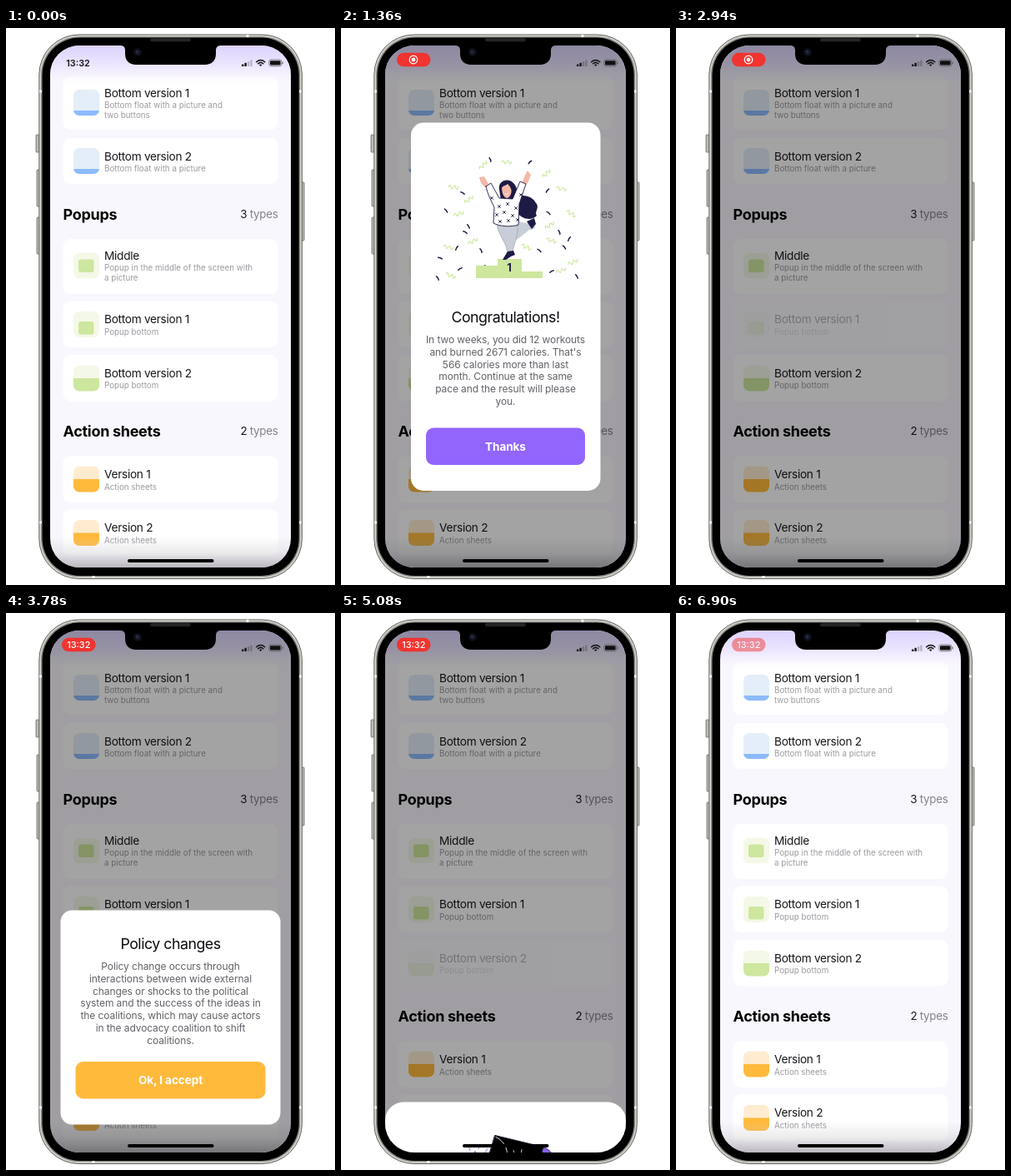
These frames come from a looping animation (395x668 px, 6960 ms). An HTML page:

```html
<!DOCTYPE html>
<html lang="en">
<head>
<meta charset="utf-8">
<title>Popups demo</title>
<style>
  html, body { margin: 0; width: 100%; height: 100%; overflow: hidden; background: #fff; }
  svg { display: block; width: 395px; height: 668px; font-family: Inter, "Open Sans", sans-serif; }
</style>
</head>
<body>
<svg id="stage" viewBox="0 0 395 668"></svg>
<script>
const NAVY = '#1d1b45', GREEN = '#cde79e', DARK = '#17161b', GREY = '#9b9aa0';

const rect = (x, y, w, h, r, fill, extra = '') =>
  `<rect x="${x}" y="${y}" width="${w}" height="${h}" rx="${r}" fill="${fill}" ${extra}/>`;
const path = (d, fill = 'none', stroke = 'none', width = 1, extra = '') =>
  `<path d="${d}" fill="${fill}" stroke="${stroke}" stroke-width="${width}" stroke-linecap="round" stroke-linejoin="round" ${extra}/>`;
const circle = (x, y, r, fill, extra = '') => `<circle cx="${x}" cy="${y}" r="${r}" fill="${fill}" ${extra}/>`;
const text = (x, y, str, size, { fill = DARK, weight = 400, gap = 0, anchor = 'start' } = {}) =>
  `<text x="${x}" y="${y}" font-size="${size}" fill="${fill}" font-weight="${weight}" letter-spacing="${gap}" text-anchor="${anchor}">${str}</text>`;
const centred = (y, str, size, opts) => text(197.5, y, str, size, { anchor: 'middle', ...opts });

// ---- list ----
const PALETTE = {
  blue: ['#e4eef8', '#8cbbfd'],
  green: ['#f4f8e7', GREEN],
  orange: ['#ffecd0', '#ffba3c'],
};

// top, height, icon top, colour, shape [x, y, w, h, r] inside the icon, title, subtitle lines
const BAR = [0, 15.5, 31, 16, 0];
const CARDS = [
  [58, 64, 74, 'blue', [0, 25, 31, 6, 0], 'Bottom version 1', ['Bottom float with a picture and', 'two buttons']],
  [132, 55, 144, 'blue', [0, 25, 31, 6, 0], 'Bottom version 2', ['Bottom float with a picture']],
  [253, 66, 269.5, 'green', [6, 8, 18.5, 15.5, 3], 'Middle', ['Popup in the middle of the screen with', 'a picture']],
  [327.5, 55.5, 340, 'green', [6, 12, 18.5, 15.5, 3], 'Bottom version 1', ['Popup bottom']],
  [392, 55.5, 404.5, 'green', BAR, 'Bottom version 2', ['Popup bottom']],
  [513.5, 55.5, 525.5, 'orange', BAR, 'Version 1', ['Action sheets']],
  [577.5, 56, 590, 'orange', BAR, 'Version 2', ['Action sheets']],
];

function card([top, h, iconTop, colour, [sx, sy, sw, sh, sr], title, lines], i) {
  const [pale, strong] = PALETTE[colour];
  const base = lines.length > 1 ? top + 24.5 : top + 26.5;
  return `<g id="card${i}">` + rect(68.5, top, 258, h, 9, '#fff') +
    `<g transform="translate(81 ${iconTop})" clip-path="url(#icon)">` +
    rect(0, 0, 31, 31, 0, pale) + rect(sx, sy, sw, sh, sr, strong) + '</g>' +
    text(118, base, title, 13.7, { gap: -.3 }) +
    lines.map((line, n) => text(118, base + 13.5 + n * 12, line, 9.8, { fill: GREY })).join('') + '</g>';
}

const heading = (y, title, count) =>
  text(68.5, y, title, 18, { weight: 700, gap: -.3, fill: '#000' }) +
  text(326.5, y - 2, `${count} <tspan fill="#85838a">types</tspan>`, 13.4, { gap: -.3, anchor: 'end' });

// ---- pictures ----
function confetti() {
  const dashes = [[179, 158, 70], [227, 161, -45], [146, 198, 30], [248, 195, -50], [126, 219, 50], [153, 238, 60],
    [119, 276, 20], [139, 264, -60], [116, 300, 60], [143, 289, -30], [149, 245, 30], [168, 267, 65],
    [238, 267, 40], [262, 245, 70], [274, 253, -60], [253, 292, -30], [268, 263, 50], [249, 222, 40], [171, 286, -25], [283, 298, 60]];
  const curls = [[170, 164], [199, 160], [246, 174], [135, 190], [153, 205], [265, 192], [250, 236], [129, 262],
    [158, 255], [253, 254], [278, 280], [132, 296], [264, 290], [223, 262], [141, 222], [277, 222]];
  return dashes.map(([x, y, a]) => path('M-2.5 0Q0 -1 2.5 0', 'none', NAVY, 1.5, `transform="translate(${x} ${y}) rotate(${a})"`)).join('') +
    curls.map(([x, y], i) => path('M-6 1q2 -4 3 0t3 0t3 0t3 -1', 'none', GREEN, 1.2, `transform="translate(${x} ${y}) rotate(${i * 47 % 90 - 45})"`)).join('');
}

function winner() {
  let stars = '';
  for (const [x, y] of [[190, 214], [200, 211], [210, 216], [187, 224], [196, 221], [206, 225], [191, 232], [201, 231], [212, 230], [181, 204], [216, 200]])
    stars += path(`M${x - 1.5} ${y - 1.5}l3 3m0 -3l-3 3`, 'none', NAVY, .9);
  return confetti() +
    path('M162 300V285H188V277H217V292H242V300Z', GREEN) +
    text(202, 291.5, '1', 13, { weight: 700, fill: NAVY, anchor: 'middle' }) +
    path('M190 194C188 182 202 179 208 187C213 194 211 200 219 201C230 202 232 207 235 211C238 217 232 220 235 225C229 232 217 229 212 222L192 206Z', NAVY) +
    path('M209 231L231 236C235 239 232 242 226 242L211 254L198 246Z', '#c7ced7') +
    path('M223 232L232 228L234 235L229 241Z', NAVY) +
    path('M187 232H211C215 246 208 256 206 269H200C198 255 187 247 187 232Z', '#c7ced7', '#7f8999', .5) +
    path('M200 268L207 267L209 272L204 274L198 278H194Z', NAVY) +
    path('M177 187L172 178L166 179L168 186L173 191Z M217 187L221 176L224 171L228 176L225 184L221 190Z', '#f4b8a8') +
    path('M174 190L180 186L190 204L206 205L215 184L222 187L214 211L213 236C204 239 190 238 183 234L184 215C180 207 176 199 174 190Z', '#fff', NAVY, .9) +
    stars +
    path('M193 190C193 184 205 185 205 192C205 200 202 204 199 204C195 203 193 198 193 190Z', '#f4b8a8') +
    path('M191 192C190 182 204 180 208 190L205 198C205 192 202 189 200 187C198 189 194 189 192 193Z', NAVY) +
    path('M197 199q2 1.5 4 -.5', 'none', '#fff', 1);
}

function chest() {
  const ink = '#17122b', purple = '#8c60fb';
  let coins = '';
  for (let i = 0; i < 27; i++) {
    const u = i % 9, row = Math.floor(i / 9);
    coins += `<ellipse cx="${152 + u * 8.2 + row * 2 - u * row * .3}" cy="${381 + row * 6 + u * 1.1 + Math.sin(i * 2.4) * 2}" rx="5" ry="4" fill="#fff" stroke="${ink}" stroke-width=".7"/>`;
  }
  const loose = [[144, 435], [154, 429], [159, 435]].map(([x, y]) =>
    `<ellipse cx="${x}" cy="${y}" rx="4.4" ry="3" fill="#fff" stroke="${ink}" stroke-width=".8"/>`).join('');
  return path('M242 356C258 360 260 379 251 389C245 395 238 397 229 398Z', purple, ink, .8) +
    path('M240 361C251 366 253 380 245 391', 'none', ink, .8) +
    path('M185 342L243 356L229 398L173 382Z', '#000', ink, 1) +
    path('M186 344C199 350 203 365 197 379', 'none', '#fff', .9) +
    path('M142 386L158 374L205 376L231 392L194 407Z', '#fff') + coins +
    path('M153 378L151 365L158 371L161 361L166 370L173 365L173 379Z', '#fff', purple, 1.1) +
    path('M203 379C205 373 212 375 222 374L223 380C216 382 218 389 211 389C206 389 203 384 203 379Z', '#fff', ink, .8) +
    path('M141 385L194 404V438L145 420Z', purple, ink, .9) +
    path('M194 404L231 390L227 422L194 438Z', '#7d50ee', ink, .9) +
    path('M145 391L190 407V432L149 417Z M198 408L226 397L223 419L198 431Z', 'none', ink, .8) +
    path('M161 395L171 399V411L161 407Z', purple, ink, 1) + circle(166, 402, 1.5, ink) +
    path('M166 402V406', 'none', ink, 1.2) +
    path('M139 374l5 2M143 364l5 5M153 355l2 5M166 353l-1 5M176 358l-3 4M180 367l-5 2', 'none', purple, .9) +
    path('M207 360l2 6M217 359l-1 6M226 364l-4 5M198 366l4 4', 'none', '#fff', .8) + loose;
}

// ---- popups ----
const copy = (y, lines) => lines.map((line, i) => centred(y + i * 14.75, line, 12, { fill: '#626067', gap: -.1 })).join('');
const title = (y, str) => centred(y, str, 17.8, { gap: -.5, fill: '#0c0b10' });
const button = (x, y, w, fill, label) =>
  rect(x, y, w, 44.5, 9, fill) + centred(y + 27, label, 13.6, { weight: 700, fill: '#fff', gap: -.1 });

const POPUPS = [
  { open: 740, close: 1760, card: 2, travel: 534, body:
    rect(84, 113.5, 227.5, 441.5, 15, '#fff') + winner() + title(352.5, 'Congratulations!') +
    copy(378, ['In two weeks, you did 12 workouts', "and burned 2671 calories. That's", '566 calories more than last',
      'month. Continue at the same', 'pace and the result will please', 'you.']) +
    button(102, 479.5, 191, '#9265fd', 'Thanks') },
  { open: 2850, close: 3960, card: 3, travel: 291, body:
    rect(65.5, 356.5, 264, 257, 14, '#fff') + title(403, 'Policy changes') +
    copy(428, ['Policy change occurs through', 'interactions between wide external', 'changes or shocks to the political',
      'system and the success of the ideas in', 'the coalitions, which may cause actors', 'in the advocacy coalition to shift', 'coalitions.']) +
    button(83.5, 538, 228, '#ffba3c', 'Ok, I accept') },
  { open: 4960, close: 6080, card: 4, travel: 345, body:
    rect(53, 302, 289, 400, 22, '#fff') + chest() + title(481, 'Personal offer') +
    copy(506, ["Say hello to flexible funding – you're pre-", 'screened for an exclusive personal loan offer',
      'through Zo Trust. Enter your Personal Offer', 'Code to get started.']) +
    button(121, 572, 153, 'url(#offer)', 'Read More') },
];

// ---- phone ----
const device =
  [[36, 128, 21], [37, 170, 44], [37, 227, 44], [354, 185, 70]].map(([x, y, h]) =>
    rect(x, y, 4, h, 1, '#bdbbb5', 'stroke="#55534f" stroke-width=".7"')).join('') +
  rect(39.8, 8, 315.6, 652.5, 48, '#d5d4ce', 'stroke="#55534f" stroke-width=".9"') +
  rect(42, 10.2, 311.2, 648, 46, '#8d8b87') + rect(43.5, 11.5, 308.2, 645.5, 45, '#000') +
  path('M40 76h3M40 593h3M352 76h3M352 593h3M105 657v3M290 8v3', 'none', '#f3f2ee', 3, 'style="stroke-linecap:butt"');

const notch =
  path('M137 20V21C141 21 143 23 143 27V31C143 39 148 44 156 44H239C247 44 252 39 252 31V27C252 23 254 21 258 21V20Z', '#000') +
  rect(173, 12, 49, 4.5, 2, '#1d1d1f') + path('M175 14.2H220', 'none', '#3c3c3f', 1.2, 'stroke-dasharray=".3 2"') +
  circle(158, 29, 5, '#0e0f16') + circle(158, 29, 2.6, '#1b2036') + circle(157, 28, .8, '#46506f');

const status =
  [0, 1, 2, 3].map(i => rect(283 + i * 3.4, 43.5 - i * 1.7, 2.4, 2.5 + i * 1.7, .6, i < 2 ? '#111' : 'rgba(0,0,0,.22)')).join('') +
  path('M300.6 40.7Q305.7 36.2 310.8 40.7M302.5 42.7Q305.7 40 308.9 42.7', 'none', '#111', 1.5) +
  path('M303.9 44.1Q305.7 42.7 307.5 44.1L305.7 46Z', '#111') +
  rect(315.8, 38, 15, 7.8, 2.4, 'none', 'stroke="#555" stroke-width=".7"') + rect(317, 39.2, 12.6, 5.4, 1.3, '#111') +
  rect(331.6, 40.5, 1, 2.8, .5, '#555') +
  '<g id="clock">' + text(86.5, 45.5, '13:32', 10.8, { weight: 600, anchor: 'middle' }) + '</g>' +
  '<g id="pill">' + rect(67, 29.8, 40.5, 16.5, 8.2, '#f0342f') +
  '<g id="record">' + circle(87, 38, 4.8, 'none', 'stroke="#fff" stroke-width="1.2"') + circle(87, 38, 2.4, '#fff') + '</g>' +
  '<g id="pillTime">' + text(87.3, 42, '13:32', 10.9, { weight: 500, fill: '#fff', anchor: 'middle' }) + '</g></g>';

const gradient = (id, stops) => `<linearGradient id="${id}" x2="0" y2="1">` +
  stops.map(([at, colour, alpha = 1]) => `<stop offset="${at}" stop-color="${colour}" stop-opacity="${alpha}"/>`).join('') + '</linearGradient>';

document.getElementById('stage').innerHTML = '<defs>' +
  '<clipPath id="screen">' + rect(53, 21, 289, 626, 35, '#000') + '</clipPath>' +
  '<clipPath id="icon">' + rect(0, 0, 31, 31, 7, '#000') + '</clipPath>' +
  gradient('top', [[0, '#ddd3fd'], [.5, '#ece6fe'], [1, '#f9f7fe', 0]]) +
  gradient('bottom', [[0, '#c9c7cc', 0], [.5, '#c9c7cc', .35], [1, '#bab8bd']]) +
  gradient('offer', [[0, '#57bcff'], [.35, '#6caeff'], [1, '#cf45fd']]) + '</defs>' +
  device + '<g clip-path="url(#screen)">' + rect(53, 21, 289, 626, 0, '#f9f7fe') +
  CARDS.map(card).join('') + heading(230, 'Popups', 3) + heading(490, 'Action sheets', 2) +
  rect(53, 21, 289, 48, 0, 'url(#top)') + rect(53, 610, 289, 37, 0, 'url(#bottom)') +
  rect(53, 21, 289, 626, 0, '#000', 'id="dim"') +
  POPUPS.map((p, i) => `<g id="popup${i}">${p.body}</g>`).join('') +
  status + rect(146, 637, 103.5, 4, 2, '#000') + '</g>' + notch;

// ---- motion ----
const LOOP = 6960;
const $ = id => document.getElementById(id);
const ramp = (t, from, length) => Math.min(1, Math.max(0, (t - from) / length));
const easeOut = u => 1 - (1 - u) ** 3;
const fade = (id, alpha) => $(id).setAttribute('opacity', alpha);

function draw(t) {
  let dim = 0;
  POPUPS.forEach((p, i) => {
    const shown = easeOut(ramp(t, p.open + 93, 450)) - easeOut(ramp(t, p.close, 400));
    $('popup' + i).setAttribute('transform', `translate(0 ${(1 - shown) * p.travel})`);
    $('popup' + i).style.display = shown > 0 ? '' : 'none';
    dim += ramp(t, p.open, 90) - ramp(t, p.close, 300);
    fade('card' + p.card, t < p.open ? 1 : .3 + .7 * ramp(t, p.open + 130, 220));
  });
  fade('dim', dim * .36);
  const pill = ramp(t, 60, 200) - ramp(t, 6840, 120);
  fade('pill', pill);
  fade('clock', t > 3000 ? 0 : 1 - pill);
  fade('record', t < 3300 ? 1 : 0);
  fade('pillTime', t < 3300 ? 0 : 1);
}

const start = performance.now();
function tick() {
  draw((performance.now() - start) % LOOP);
  requestAnimationFrame(tick);
}
tick();
</script>
</body>
</html>
```
